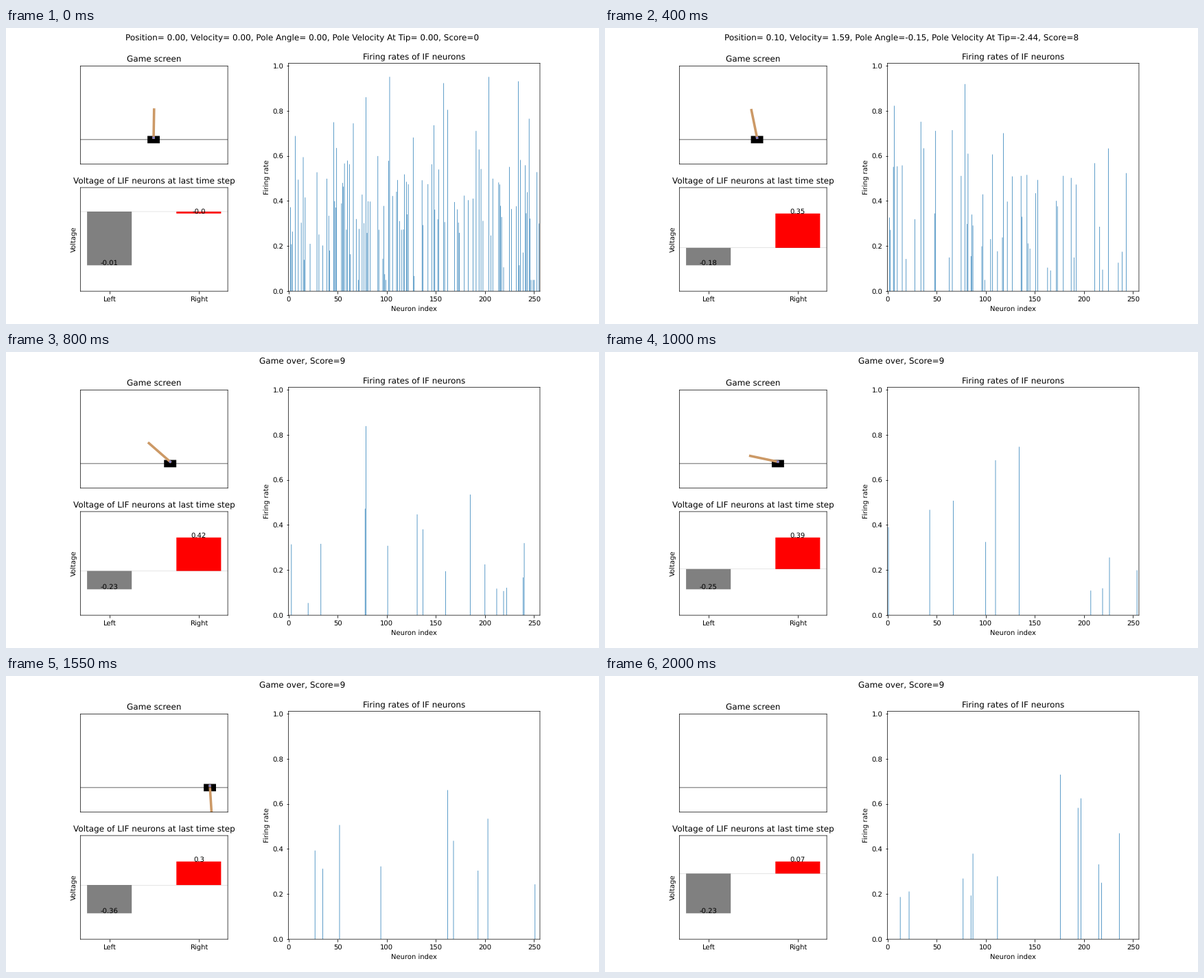
A matplotlib script that plays this animation: 864x432 px, repeating every 2050 ms.

```python
import matplotlib.pyplot as plt
import numpy as np
from matplotlib.animation import FuncAnimation
from matplotlib.patches import Circle, Polygon, Rectangle

FRAMES, INTERVAL = 41, 50
NEURONS = 256
LAST_SCORE = 9

# Key moments of the fall: output voltages and how many neurons fire
KEYS = [0, 4, 12, 20, 26, 31, 40]
LEFT_V = [-0.01, -0.144, -0.21, -0.25, -0.30, -0.36, -0.23]
RIGHT_V = [-0.00035, 0.2475, 0.45, 0.39, 0.31, 0.30, 0.07]
FIRING = [106, 84, 22, 10, 6, 9, 12]

rng = np.random.default_rng(7)
BASE_RATE = rng.normal(0.43, 0.2, NEURONS)
SPEED, RATE_SPEED = rng.uniform(0.02, 0.2, (2, NEURONS))
PHASE, RATE_PHASE = rng.uniform(0, 2 * np.pi, (2, NEURONS))


def firing_rates(n):
    """Drifting rates, kept only for the most excited neurons."""
    count = round(np.interp(n, KEYS, FIRING))
    active = np.argsort(np.sin(PHASE + SPEED * n))[-count:]
    drift = 1 + 0.25 * np.sin(RATE_PHASE + RATE_SPEED * n)
    rates = np.zeros(NEURONS)
    rates[active] = np.clip(BASE_RATE * drift, 0.05, 0.95)[active]
    return rates


def cart_pole(steps):
    """Cart-pole dynamics under a constant push to the right."""
    g, force, m, total, half, tau = 9.8, 10, 0.1, 1.1, 0.5, 0.02
    x, v, a, w = -0.016, 0.03, 0.018, -0.043
    states = [(x, v, a, w)]
    for _ in range(steps):
        s, c = np.sin(a), np.cos(a)
        push = (force + m * half * w * w * s) / total
        a_acc = (g * s - c * push) / (half * (4 / 3 - m * c * c / total))
        x_acc = push - m * half * a_acc * c / total
        x, v, a, w = x + tau * v, v + tau * x_acc, a + tau * w, w + tau * a_acc
        states.append((x, v, a, w))
    return states


STATES = cart_pole(FRAMES)

# Soft, unsnapped edges and unhinted text
plt.rcParams.update({"path.snap": False, "text.hinting": "none",
                     "axes.linewidth": 0.72})
fig = plt.figure(figsize=(12, 6), dpi=72)
fig.subplots_adjust(left=0.1254, right=0.9004, bottom=0.1108, top=0.8808)
title = fig.suptitle("")

# Game screen, 600 x 400 units
game = plt.subplot2grid((2, 9), (0, 0), colspan=3)
game.set(title="Game screen", xlim=(0, 600), ylim=(0, 400),
         xticks=[], yticks=[], aspect="equal")
SCALE, CART_Y, AXLE = 125, 100, 7.5
POLE = np.array([(-5, -5), (-5, 120), (5, 120), (5, -5)])
cart = game.add_patch(Rectangle((0, CART_Y - 15), 50, 30, fc="black", lw=0))
pole = game.add_patch(Polygon(POLE, fc=(.8, .6, .4), lw=0))
axle = game.add_patch(Circle((0, CART_Y + AXLE), 5, fc=(.5, .5, .8), lw=0))
game.axhline(CART_Y, color="black", lw=0.6)

# Output voltages
volt = plt.subplot2grid((2, 9), (1, 0), colspan=3)
volt.set_title("Voltage of LIF neurons at last time step")
volt.set_ylabel("Voltage")
volt_bars = volt.bar([0, 1], [1, 1], width=0.5, color=["gray", "red"])
volt.set_xticks([0, 1], ["Left", "Right"])
volt.set_yticks([])
volt.set_xlim(-0.325, 1.325)
volt.axhline(0, color="black", lw=0.1)
volt_labels = [volt.text(i, 0, "", ha="center") for i in (0, 1)]

# Firing rates
fire = plt.subplot2grid((2, 9), (0, 4), rowspan=2, colspan=5)
fire.set(title="Firing rates of IF neurons", xlabel="Neuron index",
         ylabel="Firing rate")
fire_bars = fire.bar(np.arange(NEURONS), np.ones(NEURONS), width=0.5,
                     color="tab:blue")
fire.set(xlim=(0, NEURONS), ylim=(0, 1.01))


def draw_game(n):
    x, _, angle, _ = STATES[n + 1]
    cx = 300 + SCALE * x
    s, c = np.sin(angle), np.cos(angle)
    cart.set_x(cx - 25)
    axle.center = cx, CART_Y + AXLE
    pole.set_xy(POLE @ np.array([(c, -s), (s, c)]) + (cx, CART_Y + AXLE))


def draw_voltages(n):
    values = [float(np.interp(n, KEYS, v)) for v in (LEFT_V, RIGHT_V)]
    for bar, label, v in zip(volt_bars, volt_labels, values):
        bar.set_height(v)
        label.set_y(v)
        label.set_text(str(round(v, 2)))
    low, high = min(values), max(values)
    pad = (high - low) / 2
    volt.set_ylim(low - pad, high + pad)


def draw(n):
    if n > LAST_SCORE:
        title.set_text(f"Game over, Score={LAST_SCORE}")
    else:
        x, v, a, w = STATES[n] if n else (0, 0, 0, 0)
        title.set_text(f"Position={x: .2f}, Velocity={v: .2f}, "
                       f"Pole Angle={a: .2f}, "
                       f"Pole Velocity At Tip={w: .2f}, Score={n}")
    draw_game(n)
    draw_voltages(n)
    for bar, rate in zip(fire_bars, firing_rates(n)):
        bar.set_height(rate)
        bar.set_visible(rate > 0)
    return []


anim = FuncAnimation(fig, draw, frames=FRAMES, interval=INTERVAL,
                     repeat=True, repeat_delay=0)
plt.show()
```
